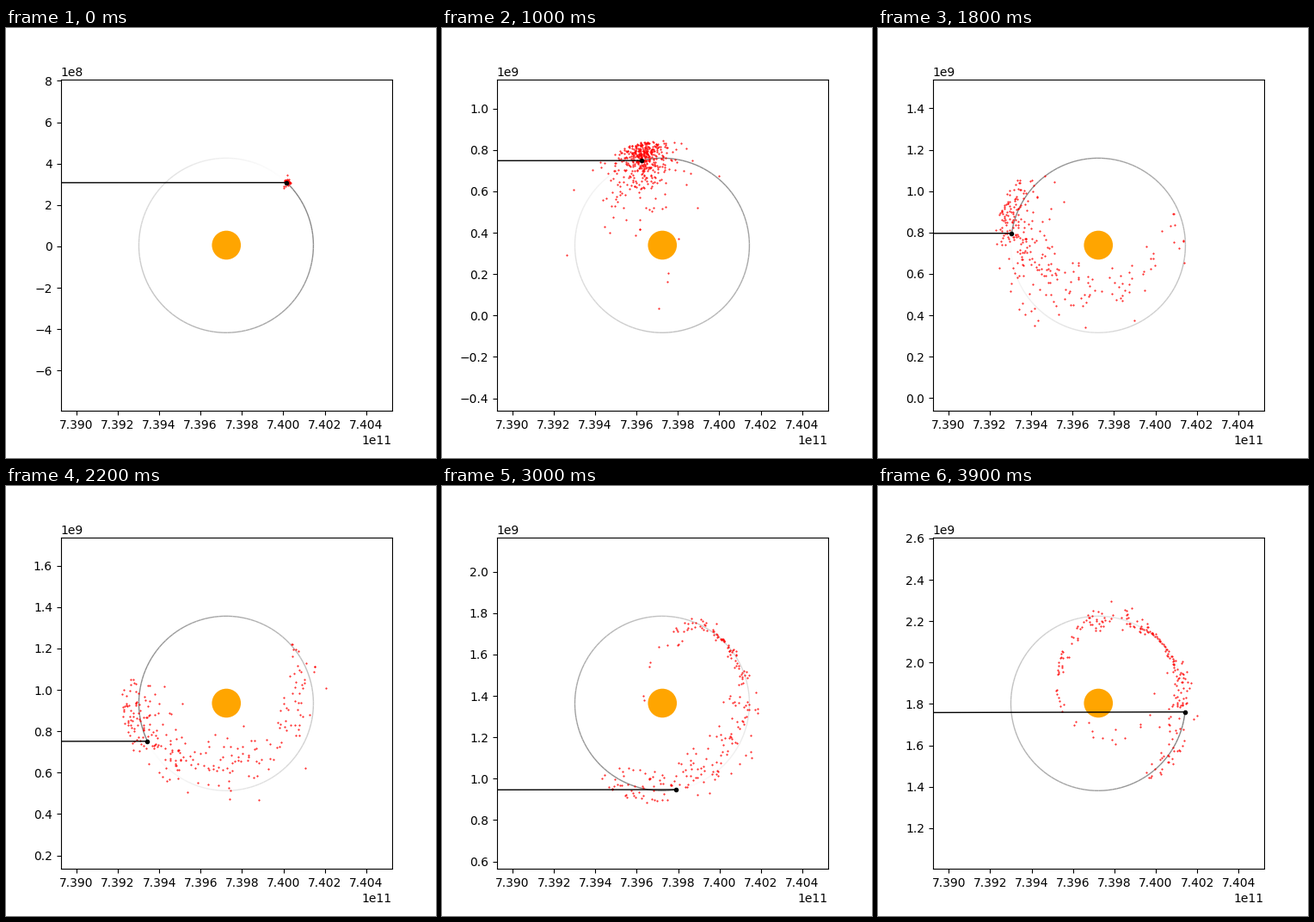
A matplotlib script for the animation above (4 s loop, 500 by 500 pixels).

```python
import numpy as np
import matplotlib.pyplot as plt
from matplotlib.animation import FuncAnimation
from matplotlib.collections import LineCollection
from matplotlib.patches import Circle

FRAMES = 40
HALF = 8e8                # half width of the view, metres
SUN_DIST = 7.39725e11
ORBIT = 4.218e8           # moon orbit: semi-major axis and eccentricity
ECC = 0.0041
PLANET = 6.99e7
TRAVEL = 2.098e9          # planet travel during one moon orbit
START = np.radians(45)
COUNT = 750

# Planet travel along y, sped up slightly after the first frames
planet_y = np.interp(np.arange(FRAMES),
                     [0, 4, 10, 14, 22, 30, 39],
                     [0.006e9, 0.12e9, 0.34e9, 0.542e9, 0.936e9, 1.365e9, 1.804e9])
planet_x = SUN_DIST - planet_y ** 2 / (2 * SUN_DIST)
swept = 2 * np.pi * planet_y / TRAVEL


def on_circle(angle):
    return np.stack([np.cos(angle), np.sin(angle)], axis=-1)


def moon_path(anomaly):
    """Moon position relative to the planet, to first order in eccentricity."""
    radius = ORBIT * (1 - ECC * np.cos(anomaly))
    angle = START + anomaly + 2 * ECC * np.sin(anomaly)
    return radius[:, None] * on_circle(angle)


def gravity(pos):
    return -pos / np.sum(pos ** 2, axis=1, keepdims=True) ** 1.5


def simulate():
    """Burst of particles in planet orbit; unit radius, unit angular speed."""
    rng = np.random.default_rng(7)
    out = on_circle(START)
    forward = on_circle(START + np.pi / 2)
    tail = np.sqrt(rng.chisquare(2, (COUNT, 1)) / 2)
    kick = rng.normal(0, 0.15, (COUNT, 2)) / tail
    pos = np.tile(out, (COUNT, 1))
    vel = forward * (1.09 + kick[:, :1]) + out * (0.06 + kick[:, 1:])
    now, states = 0.0, []
    for end in swept:
        steps = int(np.ceil((end - now) / 0.005))
        dt = (end - now) / steps
        for _ in range(steps):
            vel = vel + gravity(pos) * dt / 2
            pos = pos + vel * dt
            vel = vel + gravity(pos) * dt / 2
            r = np.hypot(pos[:, 0], pos[:, 1])
            keep = (r < 1.2) & (r > PLANET / ORBIT)
            pos, vel = pos[keep], vel[keep]
        now = end
        states.append(pos * ORBIT)
    return states


clouds = simulate()

fig, ax = plt.subplots(figsize=(5, 5), dpi=100)
ax.set_aspect("equal")

planet = ax.add_patch(Circle((0, 0), PLANET, facecolor="orange", linewidth=0, zorder=1))
SEGMENTS = 120
shades = np.linspace(0.5, 1, SEGMENTS)
trail = ax.add_collection(
    LineCollection([], colors=[(s, s, s) for s in shades], linewidths=1, zorder=1.5),
    autolim=False)
dots, = ax.plot([], [], "r.", markersize=1, zorder=2)
ray, = ax.plot([], [], "k-", linewidth=1, zorder=3)
moon, = ax.plot([], [], "k.", markersize=6, zorder=4)


def draw(i):
    center = np.array([planet_x[i], planet_y[i]])
    ax.set_xlim(center[0] - HALF, center[0] + HALF)
    ax.set_ylim(center[1] - HALF, center[1] + HALF)

    planet.center = tuple(center)
    path = center + moon_path(swept[i] - np.linspace(0, 2 * np.pi, SEGMENTS + 1))
    trail.set_segments(np.stack([path[:-1], path[1:]], axis=1))

    x, y = path[0]
    ray.set_data([0, x], [0, y])
    moon.set_data([x], [y])
    cloud = clouds[i] + center
    dots.set_data(cloud[:, 0], cloud[:, 1])
    return planet, trail, dots, ray, moon


anim = FuncAnimation(fig, draw, frames=FRAMES, interval=100, repeat=True,
                     repeat_delay=0, blit=False)
plt.show()
```
